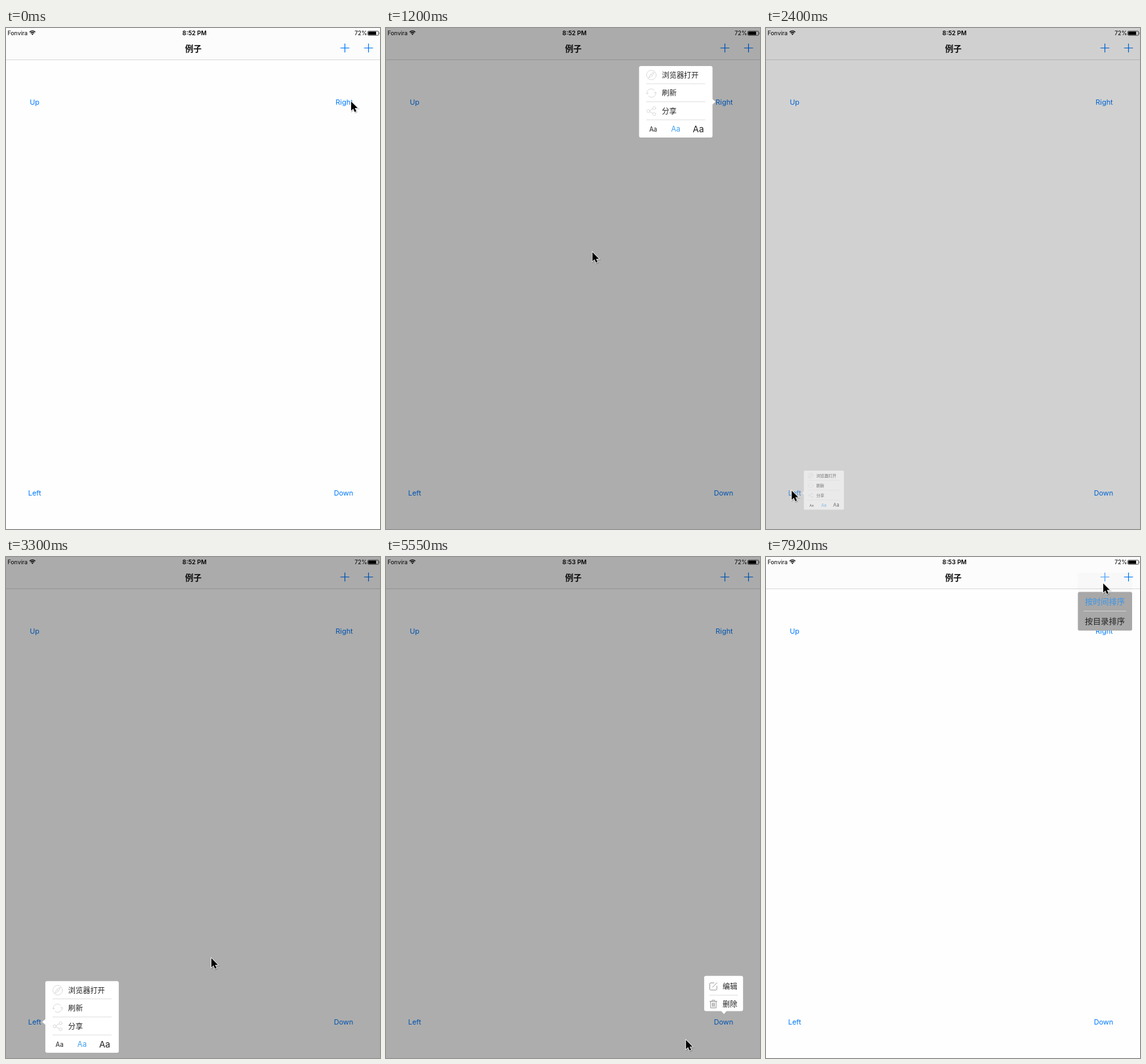
Animation of 570 by 764 pixels, one loop 8 s. Source, as an HTML page:

```html
<!DOCTYPE html>
<html lang="zh">
<head>
<meta charset="utf-8">
<style>
html, body { margin: 0; width: 100%; height: 100%; overflow: hidden; background: #fefefe; }
svg { display: block; width: 570px; height: 764px; }
text { font-family: Inter, Roboto, sans-serif; fill: #000; }
.cjk { font-family: "Noto Sans CJK SC", "Noto Sans CJK", sans-serif; font-size: 12.2px; fill: #222; }
.status { font-size: 8.8px; }
.link { font-size: 10.9px; fill: #007aff; text-anchor: middle; }
.plus { stroke: #007aff; stroke-width: 1.2; }
.icon { fill: none; stroke: #d8d8d8; stroke-width: 1; stroke-linecap: round; stroke-linejoin: round; }
.dark { stroke: #929292; }
.rule { stroke: #dcdcdc; stroke-width: 1; }
.mid { text-anchor: middle; }
</style>
</head>
<body>
<svg viewBox="0 0 570 764">
  <defs>
    <g id="menu">
      <rect width="122" height="119" rx="3" fill="#fff"/>
      <g class="icon" transform="translate(20.5 15)">
        <circle r="8"/>
        <path d="M-4.8 4.8L-1.3 -1.3L4.8 -4.8L1.3 1.3ZM-1.3 -1.3L1.3 1.3"/>
      </g>
      <g class="icon" transform="translate(20.5 45)">
        <path d="M-7 1.5A7 7 0 0 1 4.6 -5.2M7 -1.5A7 7 0 0 1 -4.6 5.2M-8 -.5L-7 1.7L-5 .4M8 .5L7 -1.7L5 -.4"/>
      </g>
      <g class="icon" transform="translate(20.5 75)">
        <circle cx="-5" r="2.5"/><circle cx="4.7" cy="-5" r="2.5"/><circle cx="4.7" cy="5" r="2.5"/>
        <path d="M-2.8 -1.1L2.5 -3.9M-2.8 1.1L2.5 3.9"/>
      </g>
      <path class="rule" d="M12 29.5H110M12 59.5H110M12 89.5H110"/>
      <text class="cjk" x="38" y="19.6">浏览器打开</text>
      <text class="cjk" x="38" y="49.6">刷新</text>
      <text class="cjk" x="38" y="79.6">分享</text>
      <text class="mid" x="23.5" y="109" font-size="10.5" style="fill:#222">Aa</text>
      <text class="mid" x="61" y="109.6" font-size="12.3" style="fill:#3d9ff0">Aa</text>
      <text class="mid" x="98.5" y="110.4" font-size="14.7" style="fill:#222">Aa</text>
    </g>
  </defs>

  <rect width="570" height="764" fill="#fefefe"/>
  <rect width="570" height="48" fill="#fcfcfc"/>
  <path d="M0 48.5H570" stroke="#dadada"/>

  <text class="status" x="2.5" y="11">Fonvira</text>
  <path d="M36 6.2A6.2 6.2 0 0 1 44.6 6.2M37.7 8A3.8 3.8 0 0 1 42.9 8" fill="none" stroke="#000" stroke-width="1.3"/>
  <path d="M40.3 10.8L38.8 9.2A2.2 2.2 0 0 1 41.8 9.2Z"/>
  <text id="clock" class="mid" x="287.3" y="11" font-size="9.2" font-weight="600">8:52 PM</text>
  <text class="status" x="531.3" y="11">72%</text>
  <rect x="551.5" y="4.9" width="16.4" height="6.2" rx="1.2" fill="none" stroke="#000" stroke-width=".7"/>
  <rect x="552.3" y="5.5" width="11.8" height="5" rx=".5"/>
  <path d="M568.7 6.8Q570 8 568.7 9.2Z"/>

  <text class="cjk mid" x="285.5" y="36" font-weight="700" style="font-size:12.6px;fill:#111">例子</text>
  <path id="plus" class="plus" d="M509.7 30.5H523.3M516.5 23.7V37.3"/>
  <path class="plus" d="M545.7 30.5H559.3M552.5 23.7V37.3"/>

  <text class="link" x="43.6" y="117">Up</text>
  <text id="right" class="link" x="515.5" y="117">Right</text>
  <text id="left" class="link" x="43.6" y="713">Left</text>
  <text id="down" class="link" x="514.4" y="713">Down</text>

  <rect id="dim" width="570" height="764"/>

  <g id="rightPop">
    <path d="M0 0L-5.6 -5V5Z" fill="#fff"/>
    <use href="#menu" x="-127" y="-59.5"/>
  </g>
  <g id="leftPop">
    <path d="M0 0L6 -5V5Z" fill="#fff"/>
    <use href="#menu" x="5.4" y="-67.8"/>
  </g>
  <g id="downPop">
    <path d="M0 0L-5 -5.6H5Z" fill="#fff"/>
    <g transform="translate(-32.8 -63.6)">
      <rect width="64.6" height="58.6" rx="3" fill="#fff"/>
      <g class="icon dark" transform="translate(15.3 17.6)">
        <path d="M1 -5.8H-4.4Q-6 -5.8 -6 -4.2V4.4Q-6 6 -4.4 6H4.2Q5.8 6 5.8 4.4V-.5M-1.5 1.5L6 -6"/>
      </g>
      <g class="icon dark" transform="translate(15.3 47)">
        <path d="M-6 -4.4H6M-2.2 -4.4V-6.4H2.2V-4.4M-4.6 -4.4V6.4H4.6V-4.4M-1.8 -1.8V4M0 -1.8V4M1.8 -1.8V4"/>
      </g>
      <path class="rule" d="M8.8 32.2H55.8"/>
      <text class="cjk" x="30.6" y="22">编辑</text>
      <text class="cjk" x="30.6" y="51.7">删除</text>
    </g>
  </g>
  <g id="sort">
    <rect x="475" y="24" width="83" height="29" opacity=".014"/>
    <rect x="475.3" y="53.3" width="82.7" height="59" rx="2.5" fill="#a8a8a8"/>
    <path d="M484 82.5H549" stroke="#cfcfcf"/>
    <text class="cjk" x="486" y="72.8" style="fill:#3b95e8">按时间排序</text>
    <text class="cjk" x="486" y="102.6">按目录排序</text>
  </g>

  <g id="cursor">
    <path d="M.6 1.4V15.6L4 12.4L6.2 17.6L9 16.4L6.8 11.4H11.4Z" opacity=".2" stroke="#000" stroke-width="1.4"/>
    <path d="M0 0V14L3.2 11L5.4 16L7.9 15L5.6 10.1H10Z" stroke="#fff" stroke-width="1.5" paint-order="stroke"/>
  </g>
</svg>
<script>
const $ = id => document.getElementById(id);
const LOOP = 8000, STEP = 150, FADE = 340, PRESS = 300;
const SORT_PRESS = 7600, SORT_SHOW = 7900;

const clamp = k => Math.min(1, Math.max(0, k));
const ease = k => (k = clamp(k), k * k * (3 - 2 * k));

// Each popover grows from its arrow tip, and shrinks back into it.
const pops = [
  { link: "right", x: 502.2, y: 112.5, open: 70, close: 1140 },
  { link: "left", x: 55, y: 709, open: 2230, close: 3240 },
  { link: "down", x: 515, y: 697, open: 4262, close: 5490 }
];

const home = { x: 526, y: 112 };
const moves = [
  { from: 300, to: 750, x: 314.6, y: 341.8 },
  { from: 1350, to: 1950, x: 39.2, y: 705.4 },
  { from: 2400, to: 2850, x: 313, y: 611.8 },
  { from: 3300, to: 3600, x: 535, y: 707.6 },
  { from: 3750, to: 4050, x: 522, y: 707.6 },
  { from: 4500, to: 5100, x: 457.2, y: 736.6 },
  { from: 5700, to: 6870, x: 521, y: 51.5 },
  { from: 7020, to: 7320, x: 514, y: 40.2 }
];

function press(id, t, since) {
  $(id).setAttribute("opacity", t < since ? 1 : .2 + .8 * clamp((t - since) / PRESS));
}

function drawPop({ link, x, y, open, close }, t) {
  const k = ease((t - open) / FADE) - ease((t - close) / FADE);
  const el = $(link + "Pop");
  el.setAttribute("opacity", clamp(k * 1.1));
  el.setAttribute("transform", `translate(${x} ${y}) scale(${k})`);
  press(link, t, open);
  return k;
}

function cursorAt(t) {
  return moves.reduce((p, m) => {
    const k = ease((t - m.from) / (m.to - m.from));
    return { x: p.x + (m.x - p.x) * k, y: p.y + (m.y - p.y) * k };
  }, home);
}

// The screen refreshes in steps; one step near the end is 20 ms shorter.
function tick(ms) {
  const shift = ms < 6580 ? 0 : 20;
  return Math.floor((ms + shift) / STEP) * STEP - shift;
}

function draw(ms) {
  const t = tick(ms);
  const shade = Math.max(...pops.map(p => drawPop(p, t)));
  $("dim").setAttribute("opacity", shade * .35);
  press("plus", t, SORT_PRESS);
  $("sort").setAttribute("visibility", ms > SORT_SHOW ? "visible" : "hidden");
  $("clock").textContent = t < 3600 ? "8:52 PM" : "8:53 PM";
  const c = cursorAt(t);
  $("cursor").setAttribute("transform", `translate(${c.x} ${c.y})`);
}

const start = performance.now();
function frame() {
  draw((performance.now() - start) % LOOP);
  requestAnimationFrame(frame);
}
draw(0);
requestAnimationFrame(frame);
</script>
</body>
</html>
```
